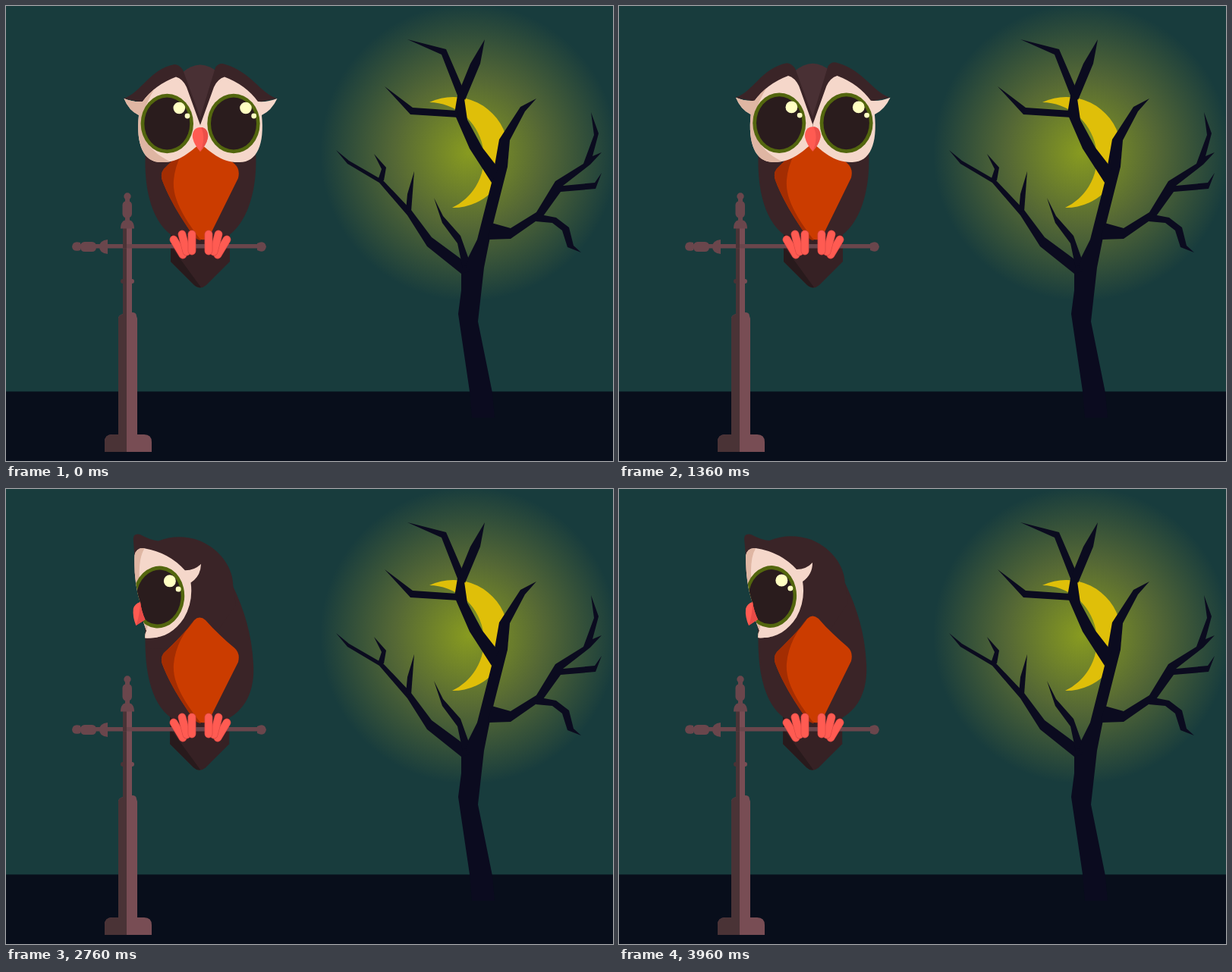
Recreate the animation shown at these times as an HTML page. Size 800x600 px, loop 4000 ms.

```html
<!DOCTYPE html>
<html lang="en">
<head>
<meta charset="utf-8">
<title>Night owl</title>
<style>
  html, body { margin: 0; width: 100%; height: 100%; overflow: hidden; background: #183c3d; }
  svg { display: block; width: 100vw; height: 100vh; }
  .tree { fill: #0b0b1f; }
  .wood { fill: #784d54; }
  .shade { fill: #4a3336; }
  .mid { fill: #6a464c; }
  .plume { fill: #3a2427; }
  .cream { fill: #f5d7ca; }
  .tan { fill: #dfb6a3; }
  .ring { fill: #53660e; }
  .pupil { fill: #2a1c1d; }
  .glint { fill: #ffffc2; }
  .red { fill: #ff5b52; }
  .claws path { fill: none; stroke-linecap: round; }
</style>
</head>
<body>
<svg viewBox="0 0 800 600">
  <defs>
    <radialGradient id="glow" gradientUnits="userSpaceOnUse" cx="610" cy="193" r="196">
      <stop offset="0" stop-color="#889b20"/>
      <stop offset=".5" stop-color="#556835"/>
      <stop offset="1" stop-color="#183c3d"/>
    </radialGradient>
    <clipPath id="profile">
      <path d="M167 88Q169 77 180 78Q213 83 234 106Q247 106 255 97Q255 113 242 122Q246 147 234 169C222 188 205 198 183 196Q183 190 185 187Q177 168 176 150Q167 125 167 88Z"/>
    </clipPath>
    <clipPath id="leftFace">
      <path d="M155.500 122Q167 127 180 126Q196 104 224 93.500Q233 96 238 107L256 157V181C243 192 228 207 204 206C181 206 171 182 175 144Q162 138 155.500 122Z"/>
    </clipPath>
    <g id="eye">
      <ellipse class="ring" rx="34.7" ry="39.2"/>
      <ellipse class="pupil" rx="30" ry="34.5"/>
      <circle class="glint" cx="16" cy="-20.5" r="7.8"/>
      <circle class="glint" cx="26.7" cy="-10" r="3.4"/>
    </g>
    <g id="chest">
      <path fill="#cb3c00" d="M248 171Q255 164 263 171C275 185 288 197 301 208Q309 215 306 227L269 302Q263 314 247 303C229 277 215 254 206 230Q203 221 208 215C222 201 238 186 248 171Z"/>
      <path fill="#a32d02" d="M248 171C238 186 222 201 208 215Q203 221 206 230C215 254 229 277 247 303Q252 309 257 309C234 279 219 254 221 230C223 206 235 186 248 171Z"/>
    </g>
  </defs>

  <rect width="800" height="600" fill="#183c3d"/>
  <circle cx="610" cy="193" r="196" fill="url(#glow)"/>
  <rect y="508.400" width="800" height="92" fill="#080e1b"/>
  <path fill="#dfbf09" d="M558 127A73 73 0 1 1 588 266A73 73 0 0 0 558 127Z"/>

  <g class="tree">
    <path d="M600 375L600 350L609 332L621 308L640 233L650 176L678 133L699 122L684 139L664 177L661 212L640 295L630 345L622 416L641 510L644 543L614 543L611 508L596 406Z"/>
    <path d="M435 190L452 204L497 230L534 269L561 305L599 333L612 350L600 353L555 317L529 276L492 233L450 208Z"/>
    <path d="M485 195L501 213L498 230L490 230L495 215Z"/>
    <path d="M538 218L534 271L527 270L529 248Z"/>
    <path d="M564 253L576 277L599 303L610 334L602 346L595 313L575 286Z"/>
    <path d="M640 233L611 188L591 142L595 118L574 64L529 44L580 57L602 108L608 150L628 187L649 214Z"/>
    <path d="M631 44L625 76L605 124L597 113L612 76Z"/>
    <path d="M499 106L536 134L595 138L597 147L533 143Z"/>
    <path d="M640 286L665 293L699 272L724 231L761 208L775 170L771 140L781 168L773 198L785 193L770 209L734 237L776 233L785 220L777 241L731 245L708 277L665 307L635 308Z"/>
    <path d="M704 275L725 279L742 292L748 316L758 325L740 318L733 296L720 286L698 284Z"/>
  </g>

  <g id="tail">
    <path fill="#362124" d="M217 293H295V337L264 368Q256 375 248 368L217 337Z"/>
    <path fill="#281a1c" d="M217 293V337L248 368Q252 372 257 371L219 319V293Z"/>
  </g>

  <g id="front">
    <g id="frontBody">
      <path class="plume" d="M184 190C181 238 191 283 218 302H294C320 283 332 238 329 190Z"/>
      <use href="#chest"/>
    </g>
    <g id="frontHead">
      <path fill="#493034" d="M232 88Q256 67 280 88L262 154H250Z"/>
      <path class="plume" d="M155 122C179 114 188 84 222 77Q228 77 233 84L256 147L276 81Q281 74 289 77C323 87 334 114 357 122L332 127L256 180L180 127Z"/>
      <path class="cream" d="M357.500 122Q345 127 332 126Q316 104 288 93.500Q279 96 274 107L256 157V181C269 192 284 207 308 206C331 206 341 182 337 144Q350 138 357.500 122Z"/>
      <g clip-path="url(#leftFace)">
        <rect class="cream" x="150" y="85" width="110" height="125"/>
        <path class="tan" d="M150 118L156 122Q181 127 199 104Q183 128 179 152C179 178 193 194 218 206L210 212H150Z"/>
      </g>
      <use href="#eye" x="212.3" y="155"/>
      <use href="#eye" x="300" y="155"/>
      <path class="red" d="M256 160C264 160 267 167 266 174Q264 183 256 192Q248 183 246 174C245 167 248 160 256 160Z"/>
      <path fill="#ec4f49" d="M257 160C264 160 267 167 266 174Q264 183 256 192Q264 174 257 160Z"/>
    </g>
  </g>

  <g id="side">
    <g id="sideBody">
      <path class="plume" d="M184 180C181 238 191 283 218 302H294C318 288 328 262 326 230C324 190 314 158 298 124Z"/>
    </g>
    <g id="sideHead">
      <path class="plume" d="M165 66Q165 58 174 60Q187 67 198 68Q225 57 254 67C282 79 298 103 298 127L302 150L262 210H186L180 160Q165 120 167 88Z"/>
      <g clip-path="url(#profile)">
        <rect class="cream" x="160" y="70" width="100" height="130"/>
        <path class="tan" d="M160 70L181 77Q173 88 174 115L188 186Q190 193 186 200H160Z"/>
        <path class="cream" d="M187 178L200 180V200H183Q184 190 187 178Z"/>
        <g transform="translate(200 142) rotate(5)">
          <ellipse class="ring" rx="34" ry="41"/>
          <ellipse class="pupil" rx="29.5" ry="36"/>
        </g>
        <circle class="glint" cx="214.3" cy="120.5" r="8"/>
        <circle class="glint" cx="225.8" cy="131" r="3.5"/>
      </g>
      <path class="red" d="M176 149Q178 162 183 172L171 180Q166 169 167 158Q169 151 176 149Z"/>
      <path fill="#e84b47" d="M176 149Q178 162 183 172L171 180Q176 166 176 149Z"/>
    </g>
    <g id="sideChest"><use href="#chest"/></g>
  </g>

  <g id="post">
    <path class="wood" d="M130 588V575Q130 565 140 565H148V412Q148 408 154 406V290H166V360A3 3 0 0 1 166 366V404Q172 404 172 409L173 412V565H182Q192 565 192 575V588Z"/>
    <path class="shade" d="M130 588V575Q130 565 140 565H148V412Q148 408 154 406V366A3 3 0 0 1 154 360V290H159V588Z"/>
    <g class="mid">
      <circle cx="160" cy="251" r="4.700"/>
      <rect x="157" y="252" width="6" height="36"/>
      <rect x="153.500" y="257" width="12.500" height="22.500" rx="5.500"/>
      <path d="M151 293.500Q151 282 160 282Q169 282 169 293.500Z"/>
      <rect x="92" y="314" width="242" height="5.500"/>
      <path d="M98 312Q88 309 87 317.500Q88 325 98 322Z"/>
      <rect x="98" y="311" width="21" height="13" rx="5.500"/>
      <path d="M134 308Q123 309 123 317.500Q123 326 134 327Z"/>
      <path d="M331 313Q341 308 343 317.500Q341 327 331 322Z"/>
    </g>
    <path class="shade" d="M154 314H159V319.5H154Z"/>
  </g>
  <g class="claws" id="claws"></g>
</svg>
<script>
  const LOOP = 4000, TURN = 2000, BREATH = 800, STEP = 40;
  const $ = id => document.getElementById(id);
  const set = (id, value) => $(id).setAttribute('transform', value);

  // scale about a fixed point
  const grow = (x, y, sx, sy) => `translate(${x} ${y}) scale(${sx} ${sy}) translate(${-x} ${-y})`;

  const toes = ['M221 308L233 328', 'M232 301L238 324', 'M245 301V323',
                'M291 308L279 328', 'M280 301L274 324', 'M267 301V323'];
  $('claws').innerHTML = toes.map(d =>
    `<path d="${d}" stroke="#d84843" stroke-width="10.8"/><path d="${d}" stroke="#ff5b52" stroke-width="9.4"/>`).join('');

  function draw(t) {
    const k = (1 - Math.cos(2 * Math.PI * t / BREATH)) / 2;
    const facing = t < TURN;
    $('front').style.display = facing ? '' : 'none';
    $('side').style.display = facing ? 'none' : '';
    set('frontHead', grow(345, 215, 1 + .012 * k, 1 + .02 * k));
    set('frontBody', grow(256, 310, 1, 1 + .008 * k));
    set('sideHead', `rotate(${1.25 * k} 175 195)`);
    set('sideBody', grow(256, 310, 1, 1 - .01 * k));
    set('sideChest', grow(255, 310, 1, 1 - .014 * k));
    set('tail', facing ? '' : 'translate(-.8 -.8)');
  }

  function tick(now) {
    draw(Math.floor(now % LOOP / STEP) * STEP);
    requestAnimationFrame(tick);
  }
  draw(0);
  requestAnimationFrame(tick);
</script>
</body>
</html>
```
